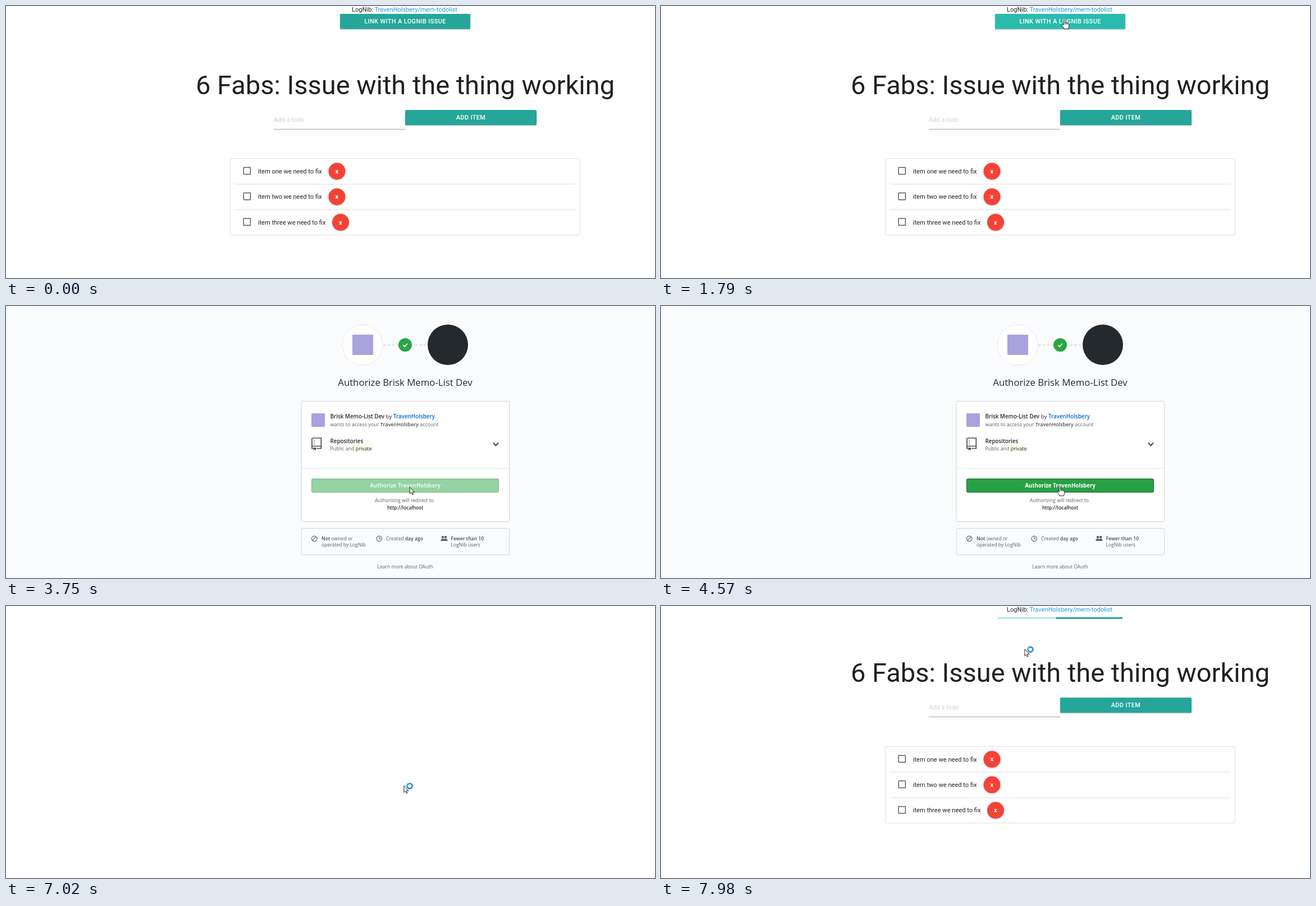
Write an HTML page that moves like this. It is 1156x484 px and loops after 8 s.

```html
<!DOCTYPE html>
<html lang="en">
<head>
<meta charset="utf-8">
<title>Linking a todo list with an issue</title>
<style>
  html, body { margin: 0; width: 100%; height: 100%; overflow: hidden; background: #fff; }
  svg { display: block; }
  .app { font: 11.1px Roboto, sans-serif; fill: #212121; }
  .app .label { font-size: 10.95px; font-weight: 500; letter-spacing: .37px; fill: #fff; text-anchor: middle; }
  .raised { filter: drop-shadow(0 1.3px 1px rgba(0, 0, 0, .25)); }
  .teal { fill: #26a69a; }
  .line { fill: none; stroke: #e0e0e0; }
  .auth { font: 8.6px "Open Sans", sans-serif; fill: #586069; }
  .auth .mid { text-anchor: middle; }
  .auth .lead { font-size: 9.8px; fill: #24292e; }
  .auth .bold { font-weight: 600; fill: #444d56; }
  .auth .dark { font-weight: 600; fill: #24292e; }
  .auth .icon { fill: none; stroke: #586069; stroke-width: 1.2; }
  .cursor path { fill: #fff; stroke: #111; stroke-width: .9; stroke-linejoin: round; }
  .cursor #busy path { fill: none; stroke: #45b4ee; stroke-width: 2.7; }
</style>
</head>
<body>
<svg width="1156" height="484" viewBox="0 0 1156 484">
  <g id="app" class="app">
    <text x="616" y="10">LogNib: <tspan fill="#2196d8">TravenHolsbery/mern-todolist</tspan></text>
    <g id="linkButton">
      <rect id="linkFace" class="raised" x="595" y="14" width="232" height="27" rx="1.5"/>
      <text class="label" x="711" y="31.4">LINK WITH A LOGNIB ISSUE</text>
    </g>
    <svg id="progress" x="600" y="20" width="222" height="3">
      <rect width="222" height="3" fill="#acece6"/>
      <rect id="bar" class="teal" height="3"/>
    </svg>
    <g id="content">
      <text x="711" y="157.3" font-size="47" text-anchor="middle">6 Fabs: Issue with the thing working</text>
      <g id="form">
        <text x="477" y="205.8" style="fill:#d0d0d0">Add a todo</text>
        <path d="M477 219.3H711" stroke="#9e9e9e"/>
        <g id="addButton">
          <rect class="raised teal" x="711" y="185" width="234" height="27" rx="1.5"/>
          <text class="label" x="828" y="202.4">ADD ITEM</text>
        </g>
      </g>
      <g id="list">
        <rect class="line" x="399.5" y="271.5" width="623" height="136" rx="1"/>
        <path class="line" d="M408 317H1014M408 362.4H1014"/>
      </g>
    </g>
  </g>

  <g id="auth" class="auth">
    <rect width="1156" height="484" fill="#fafbfc"/>
    <path d="M672 69.5H751" stroke="#d1d5da" stroke-width="1.4" stroke-dasharray="5 3"/>
    <circle cx="635" cy="69.5" r="36" fill="#fff" stroke="#e6e8eb"/>
    <rect x="617" y="51" width="37" height="36" fill="#a8a2de"/>
    <circle cx="787" cy="69" r="36" fill="#24292e"/>
    <circle cx="711" cy="69.3" r="12" fill="#28a745"/>
    <path d="M707 69.5l3 3 5-5.6" fill="none" stroke="#fff" stroke-width="1.7"/>
    <text class="mid" x="711" y="141.6" font-size="16.75" style="fill:#24292e">Authorize Brisk Memo-List Dev</text>

    <rect x="526" y="169.5" width="370.5" height="214" rx="2" fill="#fff" stroke="#d1d5da"/>
    <path d="M526 289H896" stroke="#e1e4e8"/>
    <rect x="544" y="191" width="24" height="24" fill="#a8a2de"/>
    <text class="lead" x="577.5" y="200"><tspan class="dark">Brisk Memo-List Dev</tspan> by <tspan font-weight="600" fill="#0366d6">TravenHolsbery</tspan></text>
    <text x="577.5" y="213.6" font-size="9">wants to access your <tspan class="bold">TravenHolsbery</tspan> account</text>
    <g class="icon" style="stroke:#444d56;stroke-width:1.7">
      <path d="M546 235H561.3V253.5H553M547 253.5H545V235M545 249.5H561"/>
      <path d="M549 238v1.5m0 2v1.5m0 2v1.5" stroke-width="1.5"/>
      <path d="M547.5 252V257l2.2-2 2.3 2V252Z" style="fill:#444d56;stroke:none"/>
      <path d="M868 243.5l4.5 4.8 4.5-4.8" stroke-width="2.2"/>
    </g>
    <text class="lead dark" x="577.5" y="244.3">Repositories</text>
    <rect x="622.5" y="246.5" width="31" height="13" rx="1.5" fill="#fffbe6"/>
    <text x="577.5" y="257" font-size="8.85">Public and <tspan fill="#24292e">private</tspan></text>

    <rect id="ring" x="543" y="306" width="336" height="27" rx="3" fill="none" stroke="#b0deba" stroke-width="2.4"/>
    <rect id="grant" x="544.5" y="307.5" width="333" height="24" rx="2"/>
    <text id="grantLabel" class="mid" x="711" y="323.2" font-size="9.7" font-weight="700">Authorize TravenHolsbery</text>
    <text class="mid" x="709.5" y="348.6">Authorizing will redirect to</text>
    <text class="mid dark" x="711" y="361.7">http://localhost</text>

    <rect x="526" y="395.8" width="370.5" height="47" rx="2" fill="none" stroke="#d1d5da"/>
    <g class="icon">
      <circle cx="549.2" cy="414" r="4.7"/><path d="M546 417.2l6.5-6.5"/>
      <circle cx="664.8" cy="414" r="4.7"/><path d="M664.8 411v3.3h2.6"/>
    </g>
    <g>
      <circle cx="778" cy="411.3" r="2.2"/><circle cx="783" cy="411.3" r="2.2"/>
      <path d="M774.3 418c0-3 1.5-4 3.7-4s2 1 2.5 1 .5-1 2.5-1 3.7 1 3.7 4Z"/>
    </g>
    <text x="562" y="417"><tspan class="bold">Not</tspan> owned or</text>
    <text x="562" y="428.4">operated by LogNib</text>
    <text x="677" y="417">Created <tspan class="bold">day ago</tspan></text>
    <text x="792.5" y="417" class="bold">Fewer than 10</text>
    <text x="792.5" y="428.4">LogNib users</text>
    <text class="mid" x="711" y="467" font-size="8.5">Learn more about OAuth</text>
  </g>

  <g id="cursor" class="cursor">
    <path id="arrow" d="M.3.3V12.3L3.1 9.7 4.9 14 6.6 13.2 4.8 9.1H8.4Z"/>
    <path id="hand" d="M-1.3 1.3C-1.3-.3 1.3-.3 1.3 1.3V6C2 5 3.6 5.3 3.8 6.5 4.5 5.6 6 6 6.2 7.2 7 6.6 8.2 7 8.2 8.4V11.8C8.2 13.8 7 14.4 7 16.8H-.6C-.8 14.4-3 13-4.3 9.8-4.7 8.4-2.9 7.6-1.9 9L-1.3 10ZM1.3 6V9M3.8 6.5V9M6.2 7.2V9"/>
    <g id="busy">
      <circle cx="10.5" cy=".8" r="4.5" fill="#fff" stroke="#2b86dd" stroke-width="2.7"/>
      <path id="spin" d="M6 .8A4.5 4.5 0 0 1 10.5-3.7"/>
    </g>
  </g>
</svg>
<script>
const LOOP = 8000, AUTH = 2910, BLANK = 5410, RELOAD = 7160, SETTLE = 7450;
const el = id => document.getElementById(id);
const show = (id, on) => el(id).style.display = on ? "" : "none";
const set = (id, attrs) => Object.entries(attrs).forEach(([k, v]) => el(id).setAttribute(k, v));
const ramp = (t, a, b) => Math.min(1, Math.max(0, (t - a) / (b - a)));
const ease = p => p < .5 ? 2 * p * p : 1 - 2 * (1 - p) ** 2;

function bezier(x1, y1, x2, y2) {
  const at = (s, a, b) => 3 * (1 - s) ** 2 * s * a + 3 * (1 - s) * s * s * b + s ** 3;
  return x => {
    let lo = 0, hi = 1;
    for (let i = 0; i < 24; i++) {
      const mid = (lo + hi) / 2;
      if (at(mid, x1, x2) < x) lo = mid; else hi = mid;
    }
    return at(lo, y1, y2);
  };
}
const barEase = bezier(.65, .815, .735, .395);

// Cursor stops: time, x, y
const route = [
  [370, 1080, 488], [1150, 726, 24], [1180, 726, 24], [1400, 718.5, 24],
  [1790, 718.5, 24], [2370, 764, 171], [3370, 764, 171], [3640, 724, 350],
  [3750, 719, 322], [4000, 719, 322], [4340, 710.5, 321], [4950, 710.5, 321],
  [5000, 708.5, 319.5], [7500, 708.5, 319.5], [7950, 647.5, 76.5]
];
function cursorAt(t) {
  const i = route.findIndex(stop => stop[0] > t);
  if (i === 0) return route[0].slice(1);
  if (i < 0) return route.at(-1).slice(1);
  const [t0, x0, y0] = route[i - 1], [t1, x1, y1] = route[i];
  const p = ease(ramp(t, t0, t1));
  return [x0 + (x1 - x0) * p, y0 + (y1 - y0) * p];
}

[["one", 589.5], ["two", 589.5], ["three", 596]].forEach(([word, x], i) => {
  const y = 294 + i * 45.4;
  el("list").insertAdjacentHTML("beforeend", `
    <rect x="423.2" y="${y - 6.8}" width="12.2" height="12.2" rx=".8" fill="none" stroke="#5a5a5a" stroke-width="1.5"/>
    <text x="448.7" y="${y + 4}">item ${word} we need to fix</text>
    <circle class="raised" cx="${x}" cy="${y}" r="15" fill="#f44336"/>
    <text class="label" x="${x}" y="${y + 3.7}" style="font-weight:700">x</text>`);
});

function draw(t) {
  const reloaded = t >= RELOAD, settled = t >= SETTLE;
  show("app", t < AUTH || reloaded);
  show("auth", t >= AUTH && t < BLANK);
  show("linkButton", !reloaded);
  show("progress", reloaded);

  const hover = ramp(t, 1050, 1200) - ramp(t, 1930, 2130);
  const mix = (a, b) => a + (b - a) * hover;
  set("linkFace", { fill: `rgb(${mix(38, 43)},${mix(166, 187)},${mix(154, 173)})` });

  set("content", { transform: `translate(0 ${reloaded ? -22 : 0})` });
  set("form", { transform: `translate(${reloaded && !settled ? -7.5 : 0} 0)` });
  set("list", { transform: `translate(0 ${reloaded && settled ? .7 : 0})` });
  set("addButton", { opacity: reloaded ? ramp(t, RELOAD, 7352) : 1 });

  const p = barEase(ramp(t, 7106, 7106 + 1260));
  const left = 222 * (-.35 + 1.35 * p), right = 222 * 1.9 * p;
  set("bar", { x: left, width: Math.max(0, right - left) });

  const enabled = t >= 4000;
  set("grant", {
    fill: !enabled ? "#94d3a2" : t < 4150 ? "#28a745" : "#28a044",
    stroke: enabled ? "#1f6b33" : "#80b28d"
  });
  set("grantLabel", { fill: enabled ? "#fff" : "#eaf6ec" });
  show("ring", t >= 4690);

  const hand = t >= 1050 && t < 1930 || enabled && t < 4950;
  set("cursor", { transform: `translate(${cursorAt(t)})` });
  show("hand", hand);
  show("arrow", !hand);
  show("busy", t >= 7020);
  set("spin", { transform: `rotate(${(t - 7020) * .36} 10.5 .8)` });
}

function tick() {
  draw(performance.now() % LOOP);
  requestAnimationFrame(tick);
}
tick();
</script>
</body>
</html>
```
